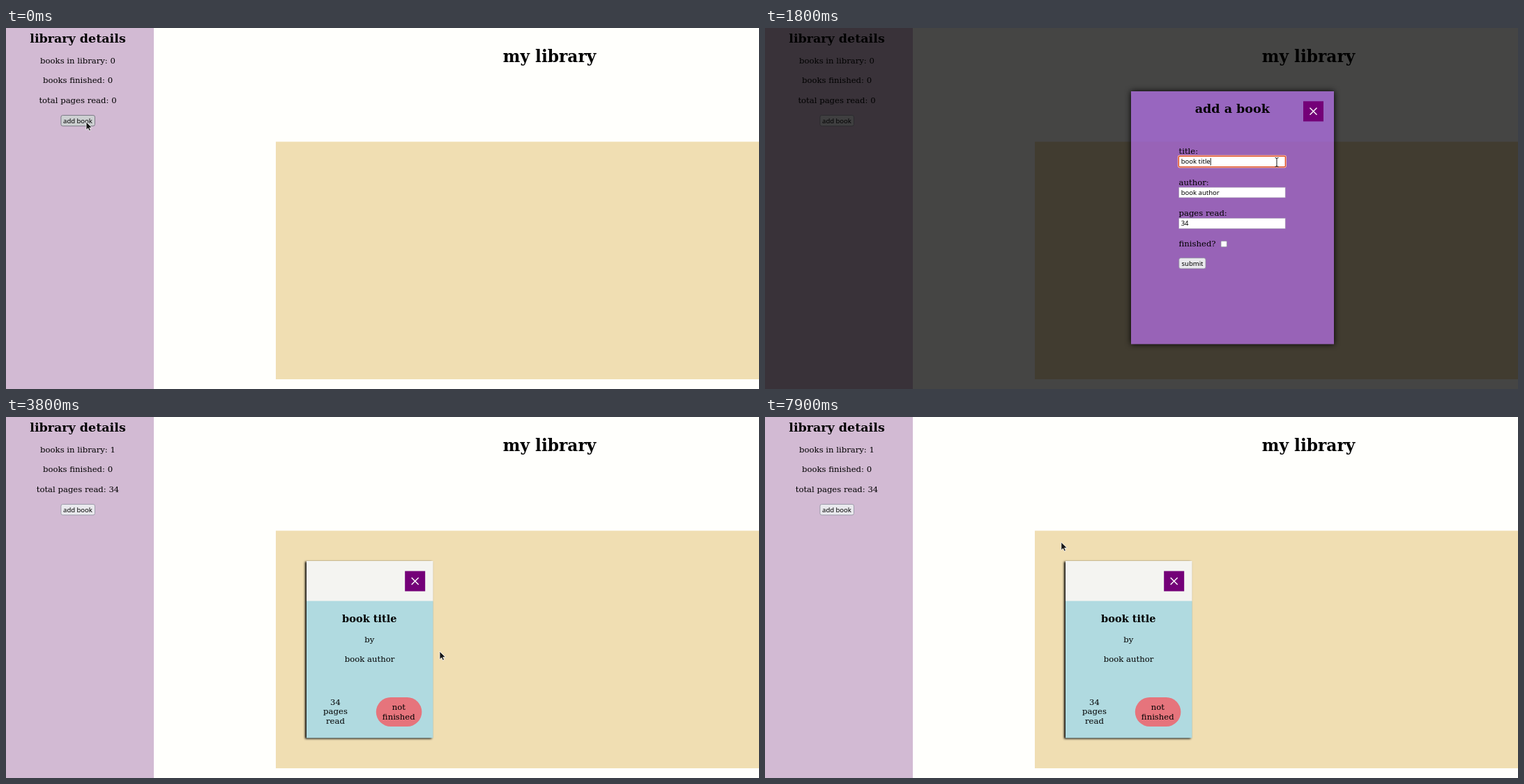
An HTML page for the animation above (8 s loop, 1080 px wide and 519 px high).

```html
<!DOCTYPE html>
<html lang="en">
<head>
<meta charset="utf-8">
<title>my library</title>
<style>
html, body { margin: 0; width: 100%; height: 100%; overflow: hidden; background: #fffffc; }
svg { display: block; width: 100%; height: 100%; }
text { font: 11.66px "DejaVu Serif", "Noto Serif", serif; }
.mid { text-anchor: middle; }
.h1, .h2, .h3 { font-weight: bold; text-anchor: middle; }
.h1 { font-size: 23.3px; }
.h2 { font-size: 17.5px; }
.h3 { font-size: 14.56px; }
.ui { font: 9.5px Ubuntu, "Noto Sans", "Open Sans", sans-serif; }
.button { fill: #e9e9ed; stroke: #8f8f9d; stroke-width: .8; }
.button.hover { fill: #cdd0d2; stroke: #676774; }
.button.active { fill: #b1b1b5; stroke: #484851; }
.field { fill: #fff; stroke: #a59bb0; stroke-width: .6; }
#panel { filter: drop-shadow(0 0 4px #000); }
#cover { filter: drop-shadow(-1.5px 1.5px 1.6px #000); }
#pill { fill: #e6747c; }
#pill.done { fill: #8fd694; }
#pill.hover { filter: drop-shadow(-1px 1px 1.5px #000); }
</style>
</head>
<body>
<svg viewBox="0 0 1080 519" preserveAspectRatio="none">
  <defs>
    <g id="close">
      <rect width="29" height="29" fill="#740078"/>
      <path d="M9.5 9.5l10 10m0-10l-10 10" stroke="#fff" stroke-width="1.4"/>
    </g>
  </defs>

  <rect width="1080" height="519" fill="#fffffc"/>
  <rect width="212" height="519" fill="#d2bad3"/>
  <rect x="387" y="163.5" width="693" height="341.5" fill="#f0deb2"/>
  <text class="h1" x="779.5" y="48.5">my library</text>
  <text class="h2" x="103" y="21">library details</text>
  <text class="mid" x="103" y="51" id="books"></text>
  <text class="mid" x="103" y="79.3" id="finished"></text>
  <text class="mid" x="103" y="107.7" id="pages"></text>
  <rect class="button" id="add" x="78.9" y="125.5" width="48.6" height="15.4" rx="2.5"/>
  <text class="ui mid" x="103" y="136.6">add book</text>

  <g id="card">
    <g id="cover">
      <rect x="431" y="207" width="181.5" height="58" fill="#f4f4f1"/>
      <rect x="431" y="264.5" width="181.5" height="197" fill="#b0dae0"/>
    </g>
    <use href="#close" x="572.2" y="221.5"/>
    <text class="h3" x="521.3" y="295">book title</text>
    <text class="mid" x="521.3" y="324.3">by</text>
    <text class="mid" x="521.5" y="352">book author</text>
    <text class="mid" x="472.5" y="413.5">34</text>
    <text class="mid" x="472.5" y="427.3">pages</text>
    <text class="mid" x="472.5" y="441.2">read</text>
    <rect id="pill" x="530.8" y="403" width="65.6" height="42" rx="21"/>
    <g id="unread">
      <text class="mid" x="563.3" y="421">not</text>
      <text class="mid" x="563.3" y="434.8">finished</text>
    </g>
    <text class="mid" x="563.3" y="428" id="read">finished</text>
  </g>

  <g id="modal">
    <rect width="1080" height="519" fill="#000" opacity=".73"/>
    <g id="panel">
      <rect x="525" y="91" width="291" height="363.5" fill="#9863b7"/>
      <rect x="525" y="91" width="291" height="72.5" fill="#9866bf"/>
    </g>
    <text class="h2" x="670.3" y="122">add a book</text>
    <use href="#close" x="772" y="105.3"/>
    <g id="fields"></g>
    <text x="593.5" y="314">finished?</text>
    <rect x="654" y="306.3" width="8.4" height="8.4" rx="1.3" fill="#fff" stroke="#8f8f9d" stroke-width=".8"/>
    <rect class="button" id="submit" x="593.8" y="330.7" width="38.2" height="15.2" rx="2.5"/>
    <text class="ui mid" x="613" y="341.7">submit</text>
    <g id="focus" fill="none">
      <rect x="592.4" y="183.4" width="155" height="17.2" rx="2.5" stroke="#f5b9a5" stroke-width="1.2"/>
      <rect x="593.4" y="184.4" width="153" height="15.2" rx="1.5" stroke="#dc4a22" stroke-width="1.3"/>
      <path id="caret" d="M0 187v10.5" stroke="#000" stroke-width=".9"/>
    </g>
  </g>

  <g id="cursor">
    <path id="arrow" d="M0 0V11.6L2.7 9.1L4.5 13L6.5 12.1L4.8 8.3H8.4Z" fill="#161616" stroke="#fff" stroke-width=".8"/>
    <path id="beam" d="M-2.5-6.5Q0-6.5 0-5Q0-6.5 2.5-6.5M0-5V5M-2.5 6.5Q0 6.5 0 5Q0 6.5 2.5 6.5" fill="none" stroke="#161616"/>
    <path id="hand" d="M-1 1Q0-.5 1 1V5Q2.5 4 3.2 5.4Q4.7 4.6 5.3 6Q7 5.6 7 7.5V10L6 13.5H-.5L-4 9Q-4.6 6.7-2.7 7.4L-1 8.7Z" fill="#fff" stroke="#161616" stroke-width=".8"/>
  </g>
</svg>
<script>
const LOOP = 8000, STEP = 100, ROW = 44.5;
const $ = id => document.getElementById(id);
const show = (id, on) => $(id).style.display = on ? "" : "none";

const rows = [["title:", "book title"], ["author:", "book author"], ["pages read:", "34"]];
$("fields").innerHTML = rows.map(([label, value], i) => `
  <g transform="translate(0 ${i * ROW})">
    <text x="593.5" y="181">${label}</text>
    <rect class="field" x="593.7" y="184.6" width="152.5" height="14.8"/>
    <text class="ui value" x="596.7" y="195.3">${value}</text>
  </g>`).join("");
const values = document.querySelectorAll(".value");

// pointer stops: time, x, y
const path = [
  [0, 115, 135], [1000, 115, 135], [1500, 738, 202], [1600, 734, 193],
  [1800, 734, 193], [2200, 736, 237], [2400, 736, 237], [2600, 672.7, 269],
  [3000, 739, 286], [3100, 739, 286], [3400, 622, 337],
  [4500, 622, 337], [4700, 550, 328], [4800, 550, 328], [5200, 525, 441], [5400, 568, 427],
  [6500, 568, 427], [6900, 470, 360], [7400, 298, 217],
  [7700, 93, 46], [7900, 424.8, 180], [LOOP, 424.8, 180]
];

function pointer(t) {
  const i = path.findIndex(p => p[0] > t);
  const [t0, x0, y0] = path[i - 1], [t1, x1, y1] = path[i];
  const k = (t - t0) / (t1 - t0);
  return [x0 + (x1 - x0) * k, y0 + (y1 - y0) * k];
}

const inside = (x, y, l, t, r, b) => x >= l && x <= r && y >= t && y <= b;

function draw(now) {
  const t = Math.floor(now % LOOP / STEP) * STEP;
  const between = (a, b) => t >= a && t < b;
  const [x, y] = pointer(t);
  const open = between(700, 3800), added = t >= 3800, done = between(5900, 6400);

  $("books").textContent = "books in library: " + +added;
  $("finished").textContent = "books finished: " + +done;
  $("pages").textContent = "total pages read: " + (added ? 34 : 0);
  show("card", added);
  show("modal", open);
  show("unread", !done);
  show("read", done);

  const onPill = added && inside(x, y, 531, 403, 596, 445);
  const onField = open && rows.some((_, i) => inside(x, y - i * ROW, 593, 184, 747, 200));
  $("pill").classList.toggle("hover", onPill);
  $("pill").classList.toggle("done", done);
  $("add").setAttribute("class", "button " + (t < 500 ? "hover" : t < 700 ? "active" : ""));
  const onSubmit = open && inside(x, y, 593, 331, 632, 346);
  $("submit").setAttribute("class", "button " + (t >= 3700 ? "active" : onSubmit ? "hover" : ""));

  const row = between(1800, 2400) ? 0 : between(2400, 2900) ? 1 : between(2900, 3700) ? 2 : -1;
  show("focus", row >= 0);
  if (row >= 0) {
    const end = 597.2 + values[row].getComputedTextLength();
    $("focus").setAttribute("transform", `translate(0 ${row * ROW})`);
    $("caret").setAttribute("transform", `translate(${end} 0)`);
  }

  $("cursor").setAttribute("transform", `translate(${x} ${y})`);
  show("hand", onPill);
  show("beam", onField);
  show("arrow", !onPill && !onField);
}

let start;
function tick(now) {
  start ??= now;
  draw(now - start);
  requestAnimationFrame(tick);
}
draw(0);
requestAnimationFrame(tick);
</script>
</body>
</html>
```
